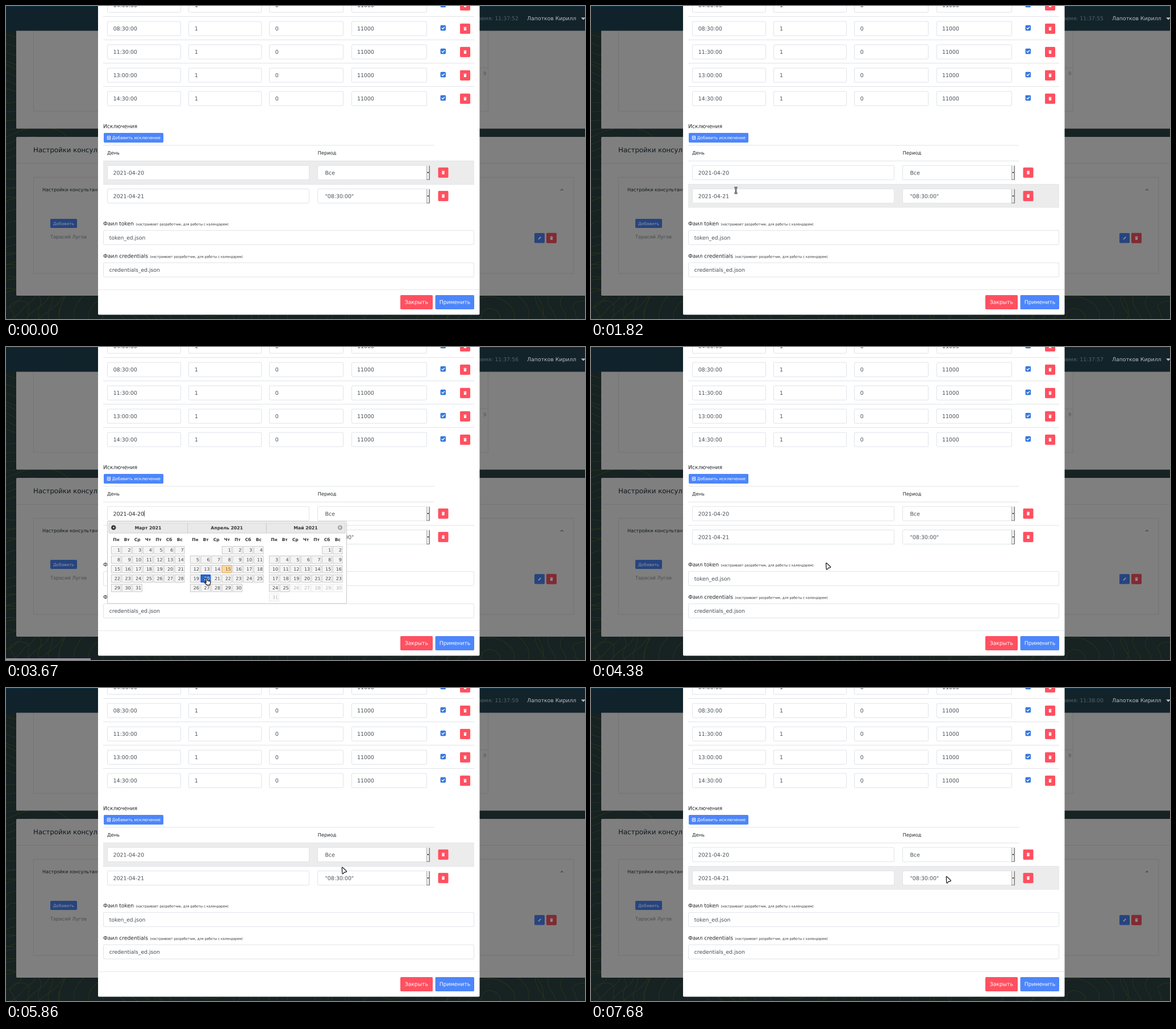
An HTML page with a canvas that plays this animation: 1019 px wide and 550 px high, repeating every 8000 ms.

```html
<!DOCTYPE html>
<html lang="ru">
<head>
<meta charset="utf-8">
<title>Исключения</title>
<style>
  html, body { margin: 0; width: 100%; height: 100%; overflow: hidden; background: #172222; }
  canvas { display: block; width: 1019px; height: 550px; }
</style>
</head>
<body>
<canvas id="stage"></canvas>
<script>
const W = 1019, H = 550, LOOP = 8000;
const SCALE = 2; // drawn oversized and shrunk, for soft text on fractional baselines
const FONT = '"DejaVu Sans", sans-serif';
const BLUE = '#4d86fb', RED = '#ff5060', LINE = '#dfe3e8', INK = '#495057', DARK = '#212529';

function prepare(canvas) {
  canvas.width = W * SCALE;
  canvas.height = H * SCALE;
  const c = canvas.getContext('2d');
  c.scale(SCALE, SCALE);
  return c;
}

let ctx = prepare(document.getElementById('stage'));

// ---------- drawing helpers ----------
function rect(x0, y0, x1, y1, fill) {
  ctx.fillStyle = fill;
  ctx.fillRect(x0, y0, x1 - x0, y1 - y0);
}

function box(x0, y0, x1, y1, fill, border, r = 2) {
  ctx.beginPath();
  ctx.roundRect(x0, y0, x1 - x0, y1 - y0, r);
  if (fill) { ctx.fillStyle = fill; ctx.fill(); }
  if (border) { ctx.strokeStyle = border; ctx.lineWidth = 1; ctx.stroke(); }
}

function line(x0, y0, x1, y1, color, width = 1) {
  ctx.strokeStyle = color;
  ctx.lineWidth = width;
  ctx.beginPath();
  ctx.moveTo(x0, y0);
  ctx.lineTo(x1, y1);
  ctx.stroke();
}

function poly(points, fill, stroke, width = 1) {
  ctx.beginPath();
  points.forEach(([x, y], i) => i ? ctx.lineTo(x, y) : ctx.moveTo(x, y));
  if (fill) { ctx.closePath(); ctx.fillStyle = fill; ctx.fill(); }
  if (stroke) { ctx.strokeStyle = stroke; ctx.lineWidth = width; ctx.stroke(); }
}

function text(s, x, y, size, color, align = 'left', weight = '') {
  ctx.font = `${weight} ${size}px ${FONT}`;
  ctx.textRendering = 'geometricPrecision';
  ctx.textAlign = align;
  ctx.fillStyle = color;
  ctx.fillText(s, x, y);
}

function trash(cx, cy, bg = RED, icon = '#fff') {
  box(cx - 9, cy - 9, cx + 9, cy + 9, bg);
  rect(cx - 2.6, cy - 2.7, cx + 2.6, cy - 1.7, icon);
  rect(cx - 1, cy - 3.2, cx + 1, cy - 2.6, icon);
  rect(cx - 2.1, cy - 1.3, cx + 2.1, cy + 3, icon);
}

function field(x0, x1, cy, s, tx, size = 9.4, color = INK) {
  box(x0 + .5, cy - 12.5, x1 - .5, cy + 12.5, '#fff', LINE);
  text(s, tx, cy + 3.6, size, color);
}

function select(cy, s) {
  field(548, 746, cy, s, 561.5);
  rect(740, cy - 12.5, 746, cy + 12.5, '#efefef');
  line(740.5, cy - 12, 740.5, cy + 12, '#aaa');
  line(745.3, cy - 12, 745.3, cy + 12, '#666', 1.2);
  line(740, cy + 12.3, 746, cy + 12.3, '#777');
  poly([[741.2, cy - .8], [744.6, cy - .8], [742.9, cy + 1.2]], '#000');
}

// ---------- dimmed page behind the dialog ----------
function contours() {
  ctx.strokeStyle = '#2b321d';
  ctx.lineWidth = 1;
  for (let k = 0; k < 12; k++) {
    const cx = k < 5 ? 8 : (k - 5) * 165 + 25;
    const cy = k < 5 ? 40 + k * 118 : 548 - (k % 2) * 14;
    for (let r = 14; r < 70; r += 18) {
      ctx.beginPath();
      for (let a = 0; a <= 6.3; a += .1) {
        const q = r * (1 + .22 * Math.sin(2 * a + k) + .12 * Math.sin(3 * a + k * 2));
        ctx.lineTo(cx + q * 1.4 * Math.cos(a), cy + q * Math.sin(a));
      }
      ctx.stroke();
    }
  }
}

function page() {
  const edge = '#747474', grey = '#7f7f7f';
  rect(0, 0, W, H, '#172222');
  contours();
  box(18, 20, W + 6, 215.5, grey);
  box(48.5, 20, 848.5, 185, null, edge, 0);
  line(833, 108.5, 848, 108.5, edge);
  text('9', 840, 121.5, 8.3, '#505356');
  const g = ctx.createLinearGradient(0, 0, W, 0);
  g.addColorStop(0, '#10232c');
  g.addColorStop(1, '#14232a');
  rect(0, 0, W, 43.5, g);
  rect(0, 0, W, 1, '#0d3349');
  text('Лапотков Кирилл', 917, 24.8, 9.35, '#b8bec2');
  poly([[1012, 20.3], [1020, 20.3], [1016, 24.5]], '#b8bec2');

  box(18, 230, W + 6, 509, grey);
  text('Настройки консультантов', 48, 257.1, 11.75, '#10171c');
  line(18, 276.5, W, 276.5, edge);
  box(48.5, 301, 999, 470, null, edge, 1);
  text('Настройки консультантов', 64, 325.5, 8.05, '#10171c');
  poly([[976, 324.2], [978.3, 321.8], [980.6, 324.2]], null, '#30353a', .9);
  box(78, 374, 125, 390, '#27447e');
  text('Добавить', 101.5, 384.8, 7.35, '#8d95a3', 'center');
  text('Тарасий Лугов', 78, 408.4, 8.3, '#484c50');
  box(930, 399, 948, 416.5, '#27447e');
  line(937, 410, 941.3, 405.7, '#8d95a3', 1.7);
  trash(960, 407.8, '#802b33', '#948a8c');
}

// ---------- dialog ----------
function slots() {
  const times = ['04:00:00', '08:30:00', '11:30:00', '13:00:00', '14:30:00'];
  times.forEach((time, i) => {
    const cy = -1.4 + i * 41;
    if (i) line(171, cy - 21.1, 824, cy - 21.1, LINE);
    field(178, 308, cy, time, 188.7);
    field(321, 450, cy, '1', 332);
    field(463, 594, cy, '0', 473.7);
    field(608, 741, cy, '11000', 618);
    box(764.5, cy - 5.8, 774, cy + 3.8, '#3478dc');
    poly([[766.8, cy - 1], [768.6, cy + .8], [772, cy - 2.8]], null, '#fff', 1.4);
    trash(808, cy + .3);
  });
}

function dialog() {
  box(162, -10, 833.5, 542.5, '#fff');
  slots();
  text('Исключения', 171, 214.4, 9.25, DARK);
  line(171, 244.7, 753.5, 244.7, LINE);
  text('День', 178, 261.2, 8.3, DARK);
  text('Период', 548.6, 261.2, 8.3, DARK);
  const note = '(настраивает разработчик, для работы с календарем)';
  text('Фаил token', 171, 385.7, 9.2, DARK);
  text(note, 228.5, 385.7, 5.67, DARK);
  field(171, 824, 406.9, 'token_ed.json', 181.8, 9.2);
  text('Фаил credentials', 171, 442.4, 9.2, DARK);
  text(note, 253.5, 442.4, 5.67, DARK);
  field(171, 824, 463.6, 'credentials_ed.json', 181.8, 9.25);
  line(162, 498.5, 833, 498.5, '#e5e8eb');
  box(694, 508, 751, 533, RED);
  text('Закрыть', 722.3, 523.6, 9.25, '#fff', 'center');
  box(755.5, 508, 824, 533, BLUE);
  text('Применить', 790, 523.6, 9.25, '#fff', 'center');
}

function addButton(hot) {
  box(172, 223, 277, 240, hot ? '#306bc3' : BLUE);
  box(178.3, 228.8, 183.7, 234.2, null, '#fff', .5);
  line(179.5, 231.5, 182.5, 231.5, '#fff', .9);
  line(181, 230, 181, 233, '#fff', .9);
  text('Добавить исключение', 186.7, 234.2, 7.25, '#fff');
}

function exceptions(hotRow, focused) {
  if (hotRow) rect(171, 231 + hotRow * 41.2, 824, 272.2 + hotRow * 41.2, '#ececec');
  line(171, 272.3, hotRow === 1 ? 824 : 753.5, 272.3, LINE);
  line(171, 313.4, 824, 313.4, LINE);
  const rows = [['2021-04-20', 'Все'], ['2021-04-21', '"08:30:00"']];
  rows.forEach(([day, period], i) => {
    const cy = 292.7 + i * 41.2;
    field(178, 534, cy, day, 188.6, 9.4, focused && !i ? DARK : INK);
    select(cy, period);
    trash(769.5, cy);
  });
  if (focused) line(243.3, 287.5, 243.3, 298, '#222', .8);
}

// ---------- date picker ----------
function roundArrow(x, dir, color) {
  ctx.fillStyle = color;
  ctx.beginPath();
  ctx.arc(x, 317.3, 4.2, 0, 7);
  ctx.fill();
  poly([[x - dir, 315.3], [x + dir * 1.4, 317.3], [x - dir, 319.3]], '#fff');
}

function dayCell(x, y, n, month) {
  const today = month === 1 && n === 15, chosen = month === 1 && n === 20;
  const off = month === 2 && n > 25;
  const alpha = ctx.globalAlpha;
  if (off) ctx.globalAlpha = alpha * .38;
  const fill = chosen ? '#2a68c4' : today ? '#fbd8a4' : '#f5f5f5';
  const edge = chosen ? '#003ed0' : today ? '#dba75c' : '#c9c9c9';
  box(x + .6, y - 6.5, x + 17.2, y + 6.7, fill, edge, 0);
  text(n, x + 16, y + 2.8, 7.8, chosen ? '#fff' : today ? '#8a632a' : '#454545', 'right');
  ctx.globalAlpha = alpha;
}

function picker(alpha) {
  ctx.globalAlpha = alpha;
  box(178.5, 306.5, 599.5, 450.8, '#fff', '#c8c8c8');
  const months = [['Март 2021', 0, 31], ['Апрель 2021', 3, 30], ['Май 2021', 5, 31]];
  const week = ['Пн', 'Вт', 'Ср', 'Чт', 'Пт', 'Сб', 'Вс'];
  months.forEach(([title, first, count], m) => {
    const x0 = 184.8 + m * 139;
    box(181 + m * 138.7, 309, 319.7 + m * 138.7, 327, '#e9e9e9', '#cfcfcf', 1);
    text(title, 250 + m * 138.7, 320.3, 7.7, '#333', 'center', 'bold');
    week.forEach((d, i) => text(d, x0 + 9.1 + i * 18.65, 340.8, 7.4, '#333', 'center', 'bold'));
    for (let n = 1; n <= count; n++) {
      const k = first + n - 1;
      dayCell(x0 + k % 7 * 18.65, 356.9 + Math.floor(k / 7) * 16.6, n, m);
    }
  });
  roundArrow(189.3, -1, '#333');
  roundArrow(588, 1, '#aaa');
  ctx.globalAlpha = 1;
}

// ---------- pointer ----------
const PATH = [
  [280, 640, 300], [700, 400, 272], [950, 240, 236], [1130, 227, 234], [1210, 235, 292],
  [1500, 246, 300], [1820, 255, 324], [1940, 262, 336], [2230, 312, 432], [2600, 262, 300],
  [2730, 245, 293], [3180, 245, 293], [3500, 352, 406], [3670, 352, 407], [4100, 352, 407],
  [4780, 520, 331], [5160, 589, 306], [5540, 566, 298], [5660, 568, 298], [6050, 612, 330],
  [6450, 582, 337], [6550, 579, 332], [6880, 226, 330], [7280, 451, 330], [7500, 686, 337],
  [7680, 625, 331]
];

function pointerAt(t) {
  const i = PATH.findIndex(p => p[0] > t);
  if (i < 1) return (i ? PATH[PATH.length - 1] : PATH[0]).slice(1);
  const [t0, x0, y0] = PATH[i - 1], [t1, x1, y1] = PATH[i];
  const k = (1 - Math.cos(Math.PI * (t - t0) / (t1 - t0))) / 2;
  return [x0 + (x1 - x0) * k, y0 + (y1 - y0) * k];
}

const inside = ([x, y], x0, y0, x1, y1) => x >= x0 && x <= x1 && y >= y0 && y <= y1;

function beam() {
  for (const [color, w] of [['#222', 2.5], ['#ddd', .8]]) {
    line(0, -5, 0, 5, color, w);
    line(-2.6, -5, 2.6, -5, color, w);
    line(-2.6, 5, 2.6, 5, color, w);
  }
}

function hand() {
  ctx.beginPath();
  ctx.moveTo(-.6, 0);
  ctx.quadraticCurveTo(1, -1.6, 1.8, .6);
  ctx.lineTo(2.4, 3.4);
  ctx.lineTo(7, 4.6);
  ctx.quadraticCurveTo(8.4, 5.2, 7.8, 7.6);
  ctx.lineTo(6.8, 11.4);
  ctx.lineTo(1.6, 11.4);
  ctx.lineTo(-2.4, 7.2);
  ctx.quadraticCurveTo(-2, 5.6, .4, 7);
  ctx.closePath();
}

function arrow() {
  ctx.beginPath();
  ctx.moveTo(.2, 1);
  ctx.quadraticCurveTo(.3, -.2, 1.4, .6);
  ctx.lineTo(8, 6.8);
  ctx.quadraticCurveTo(8.8, 8.2, 7.2, 8.6);
  ctx.lineTo(4.4, 9);
  ctx.lineTo(2.4, 11.4);
  ctx.quadraticCurveTo(1, 12.4, .8, 10.8);
  ctx.closePath();
}

function pointer(p, open) {
  const onDay = open && inside(p, 184, 350, 596, 447);
  const onButton = inside(p, 172, 223, 277, 240);
  const onField = !open && [[178, 280, 534, 305], [178, 321, 534, 347], [171, 394, 824, 420]]
    .some(r => inside(p, ...r)) || open && inside(p, 178, 280, 534, 305);
  ctx.save();
  ctx.translate(p[0], p[1]);
  if (onField) beam();
  else {
    if (onDay || onButton) hand(); else arrow();
    ctx.fillStyle = '#fff';
    ctx.fill();
    ctx.strokeStyle = '#111';
    ctx.lineWidth = 1.2;
    ctx.lineJoin = 'round';
    ctx.stroke();
  }
  ctx.restore();
}

// ---------- timeline ----------
const TICKS = [280, 850, 1800, 2790, 3760, 4700, 5520, 6600];

function clock(t) {
  const s = 52 + TICKS.filter(k => t >= k).length;
  return `11:${37 + Math.floor(s / 60)}:${String(s % 60).padStart(2, '0')}`;
}

function hotRow(p, open) {
  if (open && inside(p, 178, 306, 600, 451)) return 0;
  if (!inside(p, 171, 272, 824, 354)) return 0;
  return p[1] < 313 ? 1 : 2;
}

function pickerAlpha(t) {
  if (t < 2780 || t > 4220) return 0;
  return Math.min(1, (t - 2740) / 220, (4220 - t) / 200);
}

function layer(paint) {
  const canvas = document.createElement('canvas');
  const main = ctx;
  ctx = prepare(canvas);
  paint();
  ctx = main;
  return canvas;
}

const back = layer(page), front = layer(dialog);

function draw(t) {
  const alpha = pickerAlpha(t), open = alpha > 0;
  const late = pointerAt(t - 80);
  ctx.drawImage(back, 0, 0, W, H);
  text('Время: ' + clock(t), 902, 24.8, 9.3, '#53636c', 'right');
  ctx.drawImage(front, 0, 0, W, H);
  addButton(t > 400 && inside(late, 172, 223, 277, 240));
  exceptions(hotRow(late, open), t > 2750 && t < 4150);
  if (open) picker(alpha);
  if (t > 1110 && t < 1500) rect(0, 547, 4, H, '#eee');
  if (t > 3420 && t < 4200) rect(0, 547, 149, H, '#9a8fa3');
  if (t >= 280) pointer(pointerAt(t), open);
}

function frame() {
  draw(performance.now() % LOOP);
  requestAnimationFrame(frame);
}
frame();
</script>
</body>
</html>
```
